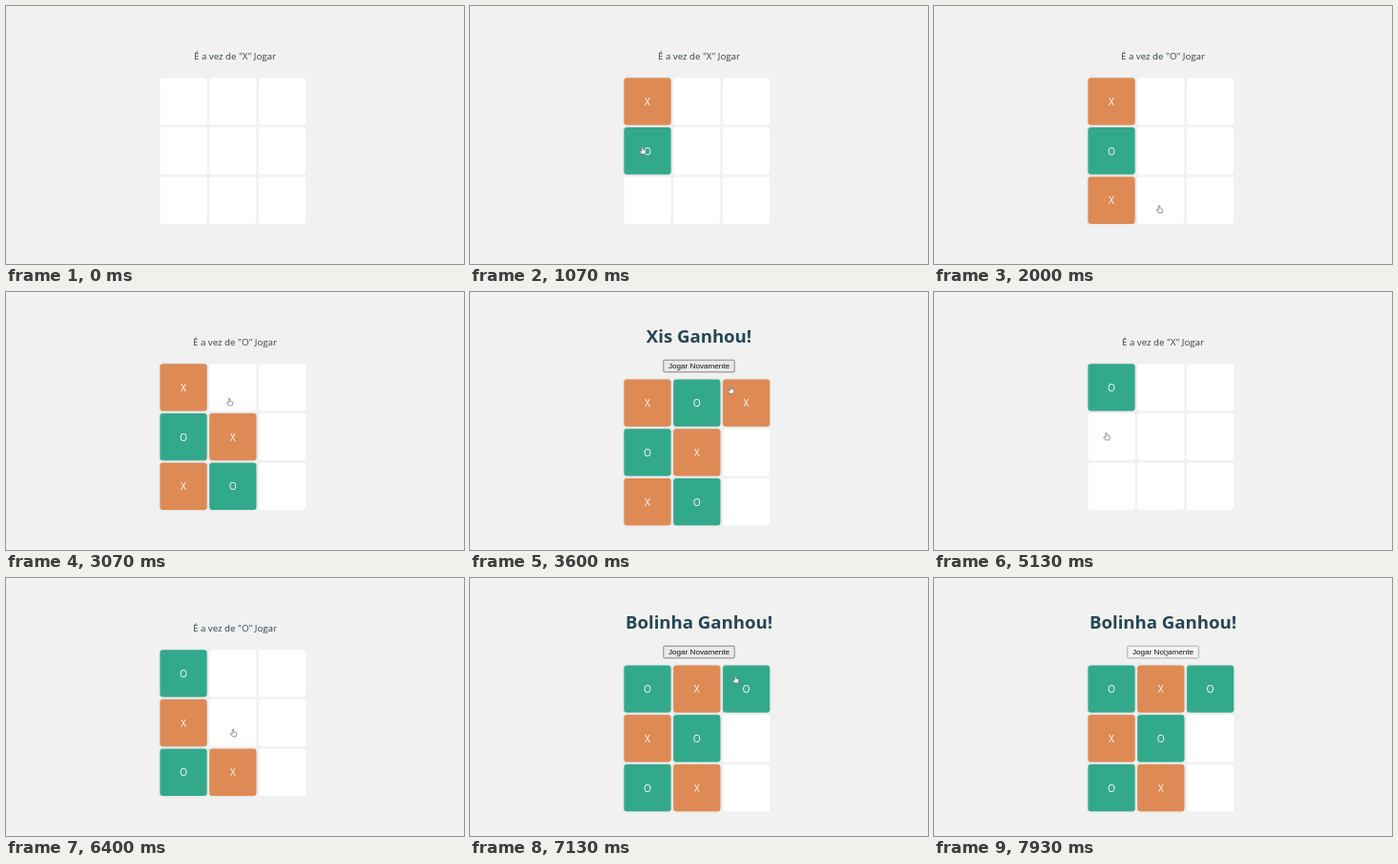
An HTML page for the animation above (8000 ms loop, 480 px wide and 270 px high).

```html
<!DOCTYPE html>
<html lang="pt">
<head>
<meta charset="utf-8">
<title>Jogo da velha</title>
<style>
  html, body { margin: 0; width: 100%; height: 100%; overflow: hidden; background: #f1f1f1; }
  svg { display: block; width: 480px; height: 270px; }
  text { font: 9.7px "Open Sans", "Noto Sans", sans-serif; text-anchor: middle; fill: #33404a; }
  .mark { font-size: 10.3px; fill: #fff; }
  .title { font-size: 18.6px; font-weight: 700; fill: #264653; }
  .button { font: 8.1px "Liberation Sans", Arial, sans-serif; fill: #111; }
  .filled { filter: drop-shadow(0 0 1.2px #0002); }
</style>
</head>
<body>
<svg viewBox="0 0 480 270"></svg>
<script>
const LOOP = 8000, PAUSE = 70, TRAVEL = 280;
const LEFT = 161.4, TOP = 75.2, PITCH = 51.8, SIZE = 49.2;
const svg = document.querySelector("svg");

// Both games click the same spots in the same order, then the button
const spots = [[186, 96], [180.5, 147], [186, 206], [236, 208.5], [238, 158], [234, 111], [278, 102]];
const games = [
  { winner: "Xis", button: [236.5, 71.5], clicks: [560, 1070, 1650, 2330, 2800, 3130, 3470, 4130] },
  { winner: "Bolinha", button: [241.5, 75], clicks: [4700, 5200, 5600, 6070, 6470, 6800, 7130, 7930] }
];
const entry = { at: 130 - PAUSE, spot: [472, 118] };
const stops = games.flatMap(({ clicks, button }) =>
  clicks.map((at, i) => ({ at, spot: spots[i] || button })));

const cellAt = ([x, y]) => Math.floor((x - LEFT) / PITCH) + 3 * Math.floor((y - TOP) / PITCH);
const text = (str, x, y, cls = "") => `<text class="${cls}" x="${x}" y="${y}">${str}</text>`;

// The pointer rests after each click, then glides to the next spot
function pointerAt(t) {
  const i = stops.findIndex(s => s.at > t);
  if (i < 0) return stops.at(-1).spot;
  const from = stops[i - 1] || entry, to = stops[i];
  const leave = from.at + PAUSE;
  const time = Math.min(TRAVEL, to.at - PAUSE - leave);
  const u = Math.min(1, Math.max(0, (t - leave) / time)), k = u * u * (3 - 2 * u);
  return from.spot.map((v, axis) => v + (to.spot[axis] - v) * k);
}

function pointer(t, top) {
  if (t < entry.at + PAUSE) return "";
  const [x, y] = pointerAt(t);
  const hand = x > LEFT && x < LEFT + 3 * PITCH && y > top;
  const shape = hand
    ? "M-.8 .7Q0-.4 .8 .7V3.6L3.6 4.2Q4.4 4.5 4.3 5.6L3.6 9H-.9L-3.2 5.6Q-2.8 4.3-.8 6Z"
    : "M0 0V6.6L1.5 5.3 2.6 7.8 3.7 7.3 2.6 4.9H4.6Z";
  return `<path transform="translate(${x} ${y}) scale(.88)" d="${shape}"
    fill="#fff" stroke="#666" stroke-width=".75" stroke-linejoin="round"/>`;
}

function board(marks, top) {
  let out = "";
  for (let cell = 0; cell < 9; cell++) {
    const x = LEFT + cell % 3 * PITCH, y = top + Math.floor(cell / 3) * PITCH;
    const mark = marks[cell];
    const fill = { X: "#de8a54", O: "#33a98c" }[mark] || "#fff";
    out += `<rect class="${mark ? "filled" : ""}" x="${x}" y="${y}" width="${SIZE}" height="${SIZE}" rx="3" fill="${fill}"/>`;
    if (mark) out += text(mark, x + SIZE / 2, y + 28.5, "mark");
  }
  return out;
}

function winHeader(winner, pressed) {
  const [fill, stroke] = pressed ? ["#f5f5f5", "#9a9a9a"] : ["#e9e9e9", "#6a6a6a"];
  return text(`${winner} Ganhou!`, 240, 52.6, "title") +
    `<rect x="202.8" y="71.2" width="74.4" height="12.6" rx="1" fill="${fill}" stroke="${stroke}" stroke-width=".8"/>` +
    text("Jogar Novamente", 240, 80.3, "button");
}

function draw() {
  const t = performance.now() % LOOP;
  const round = games.findIndex(g => t < g.clicks.at(-1) + PAUSE);
  const { winner, clicks } = games[round];
  const count = clicks.filter(at => at <= t).length;
  const won = count >= spots.length;

  // X and O keep alternating from one game into the next
  const player = i => "XO"[(round * spots.length + i) % 2];
  const marks = {};
  spots.slice(0, count).forEach((spot, i) => marks[cellAt(spot)] = player(i));

  const top = won ? TOP + 16.3 : TOP;
  const header = won
    ? winHeader(winner, count > spots.length)
    : text(`É a vez de "${player(count)}" Jogar`, 240, 55.8);
  svg.innerHTML = header + board(marks, top) + pointer(t, top);
  requestAnimationFrame(draw);
}
draw();
</script>
</body>
</html>
```
